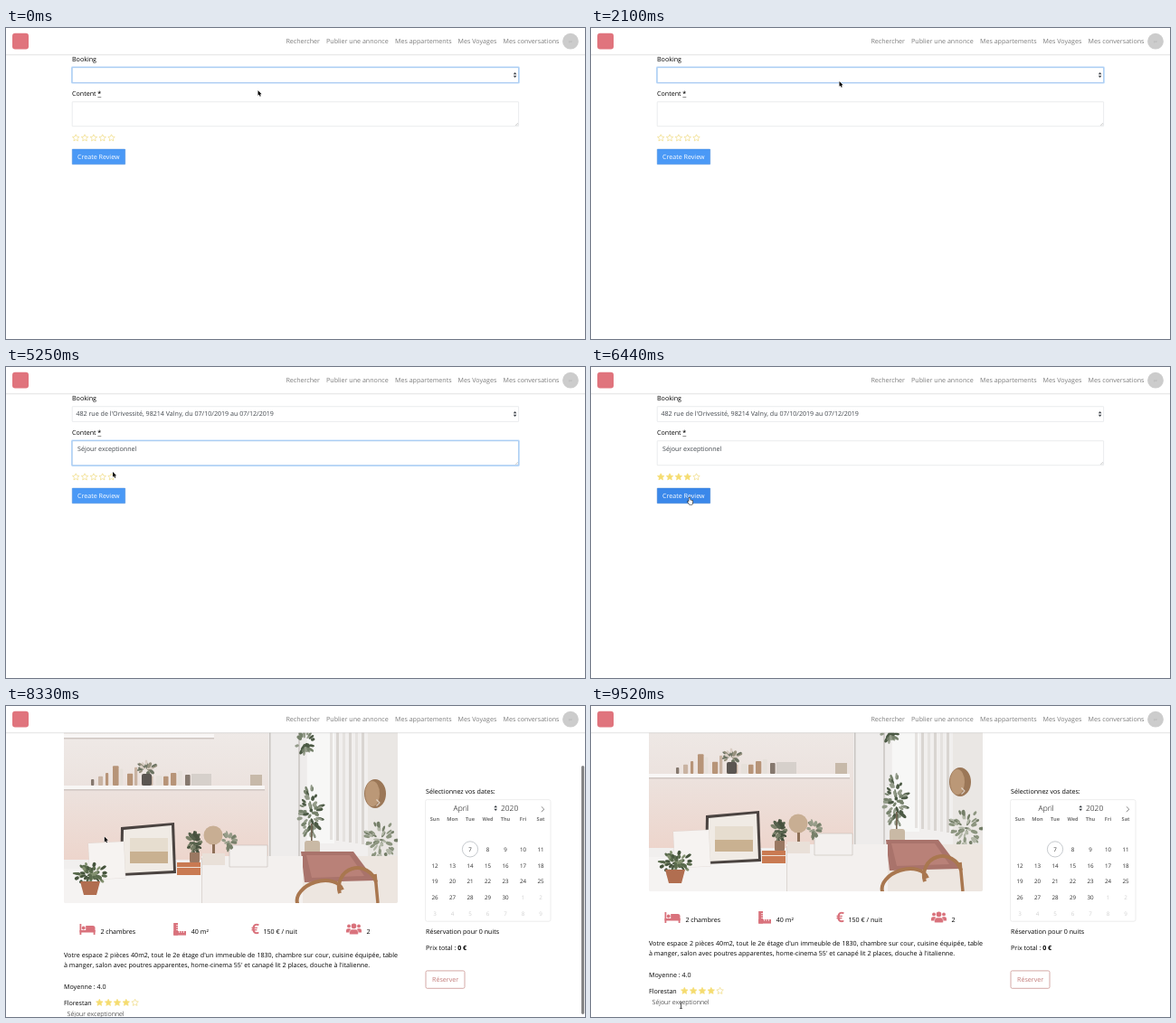
Recreate the animation shown at these times as an HTML page with a canvas. Size 640 by 344 pixels, loop 9.59 s.

```html
<!DOCTYPE html>
<html lang="fr">
<head>
<meta charset="utf-8">
<title>Review form</title>
<style>
  html, body { margin: 0; width: 100%; height: 100%; overflow: hidden; background: #fff; }
  canvas { display: block; width: 640px; height: 344px; }
</style>
</head>
<body>
<canvas id="stage"></canvas>
<script>
const W = 640, H = 344, LOOP = 9590, STEP = 70;
const ZOOM = 4 / 9; // page pixels to stage pixels
const PINK = '#d9727c', GOLD = '#f5dc70', INK = '#000';
const ADDRESS = "482 rue de l'Orivessité, 98214 Valny, du 07/10/2019 au 07/12/2019";
const REVIEW = 'Séjour exceptionnel';

const canvas = document.getElementById('stage');
const ctx = canvas.getContext('2d');
const dpr = window.devicePixelRatio || 1;
canvas.width = W * dpr;
canvas.height = H * dpr;

// ---------- helpers ----------
function rect(x, y, w, h, color) {
  ctx.fillStyle = color;
  ctx.fillRect(x, y, w, h);
}

function box(x, y, w, h, r, fill, stroke, line = 0.6) {
  ctx.beginPath();
  ctx.roundRect(x, y, w, h, r);
  if (fill) { ctx.fillStyle = fill; ctx.fill(); }
  if (stroke) { ctx.strokeStyle = stroke; ctx.lineWidth = line; ctx.stroke(); }
}

function ellipse(x, y, rx, ry, fill, turn = 0) {
  ctx.beginPath();
  ctx.ellipse(x, y, rx, ry, turn, 0, Math.PI * 2);
  ctx.fillStyle = fill;
  ctx.fill();
}

function shape(points, fill, stroke, line = 0.6, open = false) {
  ctx.beginPath();
  points.forEach(([x, y], i) => i ? ctx.lineTo(x, y) : ctx.moveTo(x, y));
  if (!open) ctx.closePath();
  ctx.lineJoin = 'round';
  if (stroke) { ctx.strokeStyle = stroke; ctx.lineWidth = line; ctx.stroke(); }
  if (fill) { ctx.fillStyle = fill; ctx.fill(); }
}

function randomFrom(seed) {
  return () => (seed = (seed * 16807) % 2147483647) / 2147483647;
}

// Scatters small leaves over an oval.
function foliage(x, y, rx, ry, count, colors) {
  const rnd = randomFrom(Math.round(x * 97 + y));
  for (let i = 0; i < count; i++) {
    const a = rnd() * Math.PI * 2, d = Math.sqrt(rnd());
    ellipse(x + rx * d * Math.cos(a), y + ry * d * Math.sin(a),
      2 + rnd() * 2, 1 + rnd(), colors[i % colors.length], a);
  }
}

function setFont(size, weight) {
  ctx.font = `${weight} ${size}px "Open Sans", sans-serif`;
  ctx.textRendering = 'geometricPrecision';
}

// Draws text at a stage position and returns its width in stage pixels.
function text(str, x, y, { size = 16, weight = 400, color = INK, align = 'left' } = {}) {
  ctx.save();
  ctx.translate(x, y);
  ctx.scale(ZOOM, ZOOM);
  setFont(size, weight);
  ctx.fillStyle = color;
  ctx.textAlign = align;
  ctx.fillText(str, 0, 0);
  const width = ctx.measureText(str).width * ZOOM;
  ctx.restore();
  return width;
}

function justified(str, x, y, width) {
  const words = str.split(' ');
  setFont(16, 400);
  const widths = words.map(w => ctx.measureText(w).width * ZOOM);
  const gap = (width - widths.reduce((a, b) => a + b)) / (words.length - 1);
  words.forEach((word, i) => {
    text(word, x, y);
    x += widths[i] + gap;
  });
}

function star(x, y, filled) {
  const points = Array.from({ length: 10 }, (_, i) => {
    const a = -Math.PI / 2 + i * Math.PI / 5, r = i % 2 ? 1.9 : 3.9;
    return [x + r * Math.cos(a), y + r * Math.sin(a)];
  });
  shape(points, filled ? GOLD : null, filled ? GOLD : '#f0da80', 0.7);
}

function stars(x, y, count) {
  for (let i = 0; i < 5; i++) star(x + i * 9.83, y, i < count);
}

function sortArrows(x, y) {
  shape([[x - 1.8, y - 0.7], [x + 1.8, y - 0.7], [x, y - 2.9]], '#343a40');
  shape([[x - 1.8, y + 0.7], [x + 1.8, y + 0.7], [x, y + 2.9]], '#343a40');
}

function field(x, y, w, h, focused) {
  if (focused) box(x - 1.2, y - 1.2, w + 2.4, h + 2.4, 1.4, '#bfdcfb');
  box(x, y, w, h, 0.4, '#fff', focused ? '#83b3e8' : '#dcdfe2');
}

const clamp = v => Math.max(0, Math.min(1, v));
const easeInOut = p => p < 0.5 ? 2 * p * p : 1 - 2 * (1 - p) * (1 - p);

// ---------- motion ----------
const PAGE_AT = 7350;

const path = [
  [140, 278.5, 69], [300, 150, 44], [420, 70, 95], [560, 220, 142], [700, 449, 139],
  [1050, 449, 139], [1400, 100, 139], [1540, 100, 139], [2100, 274.5, 59], [2170, 274, 55],
  [2450, 274, 55], [2870, 187, 87.5], [4690, 187, 87.5], [5460, 106, 121],
  [6020, 106, 121], [6440, 108.8, 144.6], [8890, 108.8, 144.6], [9520, 99.5, 331]
];

function cursorAt(t) {
  if (t <= path[0][0]) return path[0].slice(1);
  for (let i = 1; i < path.length; i++) {
    const [t0, x0, y0] = path[i - 1], [t1, x1, y1] = path[i];
    if (t <= t1) {
      const p = easeInOut((t - t0) / (t1 - t0));
      return [x0 + (x1 - x0) * p, y0 + (y1 - y0) * p];
    }
  }
  return path[path.length - 1].slice(1);
}

// Page scroll runs 3 px past its end, then springs back.
const SCROLL_MAX = 94;
function scrollAt(t) {
  const over = SCROLL_MAX + 3;
  if (t < 8610) return over * easeInOut(clamp((t - 7635) / 975));
  return over - 3 * easeInOut(clamp((t - 8610) / 490));
}

// ---------- header ----------
function header(dy) {
  rect(0, -4, W, 33.2 + dy, '#fff');
  rect(0, 29.2 + dy, W, 0.6, '#dedede');
  rect(0, 29.8 + dy, W, 0.8, 'rgba(0,0,0,.04)');
  box(7, 5.8 + dy, 18, 17.8, 3, '#e0747d');
  const links = [['Rechercher', 309.4], ['Publier une annonce', 354], ['Mes appartements', 430],
    ['Mes Voyages', 499.6], ['Mes conversations', 549.6]];
  for (const [label, x] of links) text(label, x, 17.3 + dy, { color: '#7c7c7c' });
  ellipse(624, 14.7 + dy, 8.9, 8.9, '#cccccc');
  text('pic', 624, 15.7 + dy, { size: 7, color: '#a9a9a9', align: 'center' });
}

// ---------- review form ----------
function form(t, mouse) {
  const focus = t < 2870 ? 'select' : t < 5670 ? 'content' : t >= 6720 ? 'button' : '';
  text('Booking', 73, 37.3);
  field(73.2, 43.7, 493.4, 16.7, focus === 'select');
  sortArrows(562.6, 52);
  if (t >= 2450) text(ADDRESS, 77.4, 54.4, { color: '#40464c' });

  const w = text('Content ', 73, 75.4);
  text('*', 73 + w, 75.4, { weight: 600 });
  rect(73 + w, 76, 3.9, 0.6, '#444');
  field(73.2, 81.7, 493.4, 27, focus === 'content');
  for (const d of [1.5, 3]) {
    shape([[566 - d, 108], [566, 108 - d]], null, '#999', 0.4, true);
  }
  let caretX = 79.4;
  if (t >= 4130) caretX = 79 + text(REVIEW, 79, 92.6, { color: '#40464c' }) + 0.3;
  const caretOn = focus === 'content' && !(t >= 3290 && t < 3850) && t < 4620;
  if (caretOn) rect(caretX, 85.4, 0.6, 9.3, '#444');

  stars(77.2, 121.7, t >= 5670 ? 4 : 0);

  const hover = overButton(mouse);
  if (focus === 'button') box(71.8, 132.7, 61.3, 19.5, 1.4, '#b9d8fb');
  box(73.2, 134.1, 58.5, 16.7, 0.4, hover ? '#3a88ea' : '#4a99f6', hover ? '#3679cd' : '#4788d8', 0.5);
  text('Create Review', 79, 145, { color: '#fff' });
}

// ---------- flat page ----------
function wallAndShelves() {
  const wall = ctx.createLinearGradient(0, 0, 0, 170);
  wall.addColorStop(0, '#f0edeb');
  wall.addColorStop(0.5, '#ece3df');
  wall.addColorStop(1, '#edd5cc');
  rect(64, -4, 369, 222, '#f1efee');
  rect(64, -4, 226, 174, wall);

  for (const [y, w] of [[31, 166], [88, 222]]) {
    rect(64, y, w, 4, '#f8f6f5');
    rect(64, y + 4, w, 1.5, '#cfc6c2');
  }
  const rnd = randomFrom(31);
  for (let x = 94; x < 200; x += 8) {
    const h = 7 + rnd() * 15;
    box(x, 88 - h, 3 + rnd() * 4, h, 1, ['#b79478', '#85786e', '#e6e0da', '#c9b3a2'][Math.floor(rnd() * 4)]);
  }
  foliage(156, 69, 9, 7, 22, ['#6c7362', '#98927f', '#d9cdc4']);
  box(150, 75, 11, 13, 2, '#5b5652');
  rect(205, 75, 22, 13, '#d6d0cb');
  rect(270, 76, 13, 12, '#c7b9a9');
}

function windowSide() {
  rect(290, -4, 42, 170, '#eeeceb');
  rect(291, -4, 1.5, 170, '#c9c5c2');
  rect(323, -4, 2, 170, '#d2cecb');
  rect(333, -4, 30, 156, '#f7f7f6');
  for (let i = 0; i < 6; i++) rect(358 + i * 7, -4, 3, 152 + i, i % 2 ? '#d9d5d1' : '#e5e2df');
  rect(400, -4, 33, 170, '#eae7e4');
  ellipse(408, 97, 12, 16, '#9b7757');
  ellipse(405, 97, 8, 14, '#bb9877');
  const green = ['#4c5a45', '#76826c', '#939b89'];
  foliage(330, 42, 10, 14, 26, green);
  foliage(337, 118, 13, 28, 60, green);
  rect(337, 130, 1.6, 24, '#756553');
  box(330, 149, 17, 19, 3, '#c9b9a5');
  foliage(414, 148, 18, 20, 50, ['#8c957f', '#b1b6a6', '#747e68']);
}

function furniture() {
  rect(326, 166, 107, 52, '#ede6e0');
  shape([[326, 161], [384, 161], [408, 193], [330, 195]], '#a9736b');
  shape([[332, 165], [380, 165], [396, 188], [338, 190]], '#b98178');
  rect(64, 180, 264, 38, '#f5f3f2');
  rect(216, 166, 112, 52, '#f3f0ee');
  rect(216, 168, 1, 50, '#dcd6d2');

  shape([[127, 134], [186, 129], [188, 185], [126, 188]], '#4a4340');
  shape([[130, 137], [183, 132], [185, 182], [129, 185]], '#f0ebe5');
  rect(137, 146, 42, 15, '#e6ddcf');
  rect(137, 161, 42, 13, '#c9b191');
  shape([[91, 152], [130, 150], [132, 190], [93, 192]], '#f6f3f1', '#d8d0cb');
  box(247, 154, 42, 24, 0, '#f3f0ee', '#c4bdb8');
  rect(189, 173, 26, 14, '#c97a52');
  rect(189, 178, 26, 1, '#eee2d8');

  foliage(208, 152, 7, 12, 34, ['#55604b', '#7a8069', '#48513f']);
  box(203, 162, 11, 11, 1, '#9a7862');
  ellipse(229, 143, 10.5, 10.5, '#c8ae93');
  rect(228, 153, 3, 11, '#8e7058');
  foliage(246, 150, 7, 9, 20, ['#77806a', '#969c88']);
  rect(217, 163, 25, 13, '#e9e0d8');
  foliage(93, 186, 18, 13, 55, ['#5a6b4d', '#82906f', '#45543c']);
  shape([[82, 194], [104, 194], [100, 209], [86, 209]], '#b16e50');

  ctx.strokeStyle = '#a9774f';
  ctx.lineWidth = 4;
  for (const [x, y, rx, ry] of [[389, 201, 21, 22], [347, 211, 26, 17]]) {
    ctx.beginPath();
    ctx.ellipse(x, y, rx, ry, -0.3, Math.PI, Math.PI * 2);
    ctx.stroke();
  }
  shape([[408, 186], [411, 218]], null, '#a9774f', 3.5, true);
}

function photo(bottom) {
  ctx.save();
  ctx.beginPath();
  ctx.roundRect(64, bottom - 222, 369, 222, 2);
  ctx.clip();
  ctx.translate(0, bottom - 218);
  wallAndShelves();
  windowSide();
  furniture();
  shape([[409.5, 103.5], [413, 107], [409.5, 110.5]], null, 'rgba(255,255,255,.6)', 1.2, true);
  ctx.restore();
}

function icons(y) {
  // bed
  rect(81.5, y - 6, 1.8, 12, PINK);
  rect(81.5, y + 1, 17, 2.5, PINK);
  rect(96.7, y + 1, 1.8, 5, PINK);
  box(88.2, y - 4, 10.3, 6, [0, 2.5, 0, 0], PINK);
  ellipse(85.7, y - 1.5, 1.9, 1.9, PINK);
  // ruler
  rect(185.2, y - 7, 4.8, 13.6, PINK);
  rect(185.2, y + 2, 13.8, 4.6, PINK);
  for (let i = 0; i < 3; i++) {
    rect(188, y - 5 + i * 2.6, 2, 0.7, '#fff');
    rect(191 + i * 2.6, y + 2, 0.7, 2, '#fff');
  }
  text('€', 271, y + 4.8, { size: 35, weight: 700, color: PINK });
  // group
  for (const [x, r] of [[379, 1.9], [390, 1.9], [384.5, 2.8]]) ellipse(x, y - 3.6, r, r, PINK);
  box(376, y - 0.7, 5, 4.2, [2, 1, 0, 0], PINK);
  box(388, y - 0.7, 5, 4.2, [1, 2, 0, 0], PINK);
  box(379.6, y + 0.1, 9.8, 5.6, [3, 3, 1, 1], PINK, '#fff', 0.5);
}

function calendar(dy) {
  ctx.save();
  ctx.translate(0, dy);
  text('Sélectionnez vos dates:', 464, 96.6);
  box(463.6, 103.6, 138.4, 134.6, 2, '#fff', '#ebebeb', 0.9);
  text('April', 494.6, 115.9, { size: 18.9, weight: 300 });
  sortArrows(541.2, 113);
  text('2020', 547, 115.9, { size: 18.9, weight: 300 });
  shape([[591.8, 111.3], [594.8, 114.2], [591.8, 117.1]], null, '#555', 0.7, true);

  const colX = i => 474 + i * 19.5;
  ['Sun', 'Mon', 'Tue', 'Wed', 'Thu', 'Fri', 'Sat'].forEach((day, i) =>
    text(day, colX(i), 127, { size: 12.6, weight: 700, color: '#757575', align: 'center' }));
  ctx.beginPath();
  ctx.arc(513, 158.4, 8.6, 0, Math.PI * 2);
  ctx.strokeStyle = '#a0a6ad';
  ctx.lineWidth = 0.6;
  ctx.stroke();
  for (let day = 7; day <= 39; day++) {
    const cell = day - 5, next = day > 30;
    text(next ? day - 30 : day, colX(cell % 7), 160.8 + Math.floor(cell / 7) * 17.75,
      { size: 14, color: next ? '#d0d0d0' : '#2c2c2c', align: 'center' });
  }

  text('Réservation pour 0 nuits', 464, 251.7);
  const w = text('Prix total : ', 464, 269.6);
  text('0 €', 464 + w, 269.6, { weight: 700 });
  box(464, 292.9, 43, 19.4, 1.6, '#fff', '#c99490', 0.8);
  text('Réserver', 485.6, 305.4, { color: '#c27a78', align: 'center' });
  ctx.restore();
}

function flat(t) {
  const scroll = scrollAt(t);
  const y = 299 - scroll;
  photo(y);
  icons(y + 29);
  const facts = [['2 chambres', 104.4], ['40 m²', 204.8], ['150 € / nuit', 284.4], ['2', 398.4]];
  for (const [label, x] of facts) text(label, x, y + 33.7);
  justified("Votre espace 2 pièces 40m2, tout le 2e étage d'un immeuble de 1830, chambre sur cour, cuisine équipée, table",
    64, y + 60.2, 369);
  text("à manger, salon avec poutres apparentes, home-cinema 55' et canapé lit 2 places, douche à l'italienne.",
    64, y + 70.7);
  text('Moyenne : 4.0', 64, y + 94.9);
  text('Florestan', 64, y + 112.6);
  stars(103.3, y + 110.2, 4);
  text(REVIEW, 67.5, y + 125, { weight: 300 });

  const bounce = Math.min(0, SCROLL_MAX - scroll);
  calendar(bounce);
  header(bounce);

  const shown = clamp((9310 - t) / 140);
  if (t >= 7560 && shown) {
    const top = 10 + scroll * 0.69;
    ctx.globalAlpha = shown;
    box(636, top, 3.2, Math.min(H, top + 275) - top, 1.6, '#858585');
    ctx.globalAlpha = 1;
  }
}

// ---------- mouse pointer ----------
const inside = ([x, y], l, t, r, b) => x >= l && x <= r && y >= t && y <= b;
const overButton = m => inside(m, 73, 134, 132, 151);

function pointerKind(t, m) {
  if (t >= PAGE_AT) return inside(m, 64, 322, 132, 336) ? 'beam' : 'arrow';
  if (overButton(m) || inside(m, 73, 117, 121, 126)) return 'hand';
  return inside(m, 73, 82, 567, 109) ? 'beam' : 'arrow';
}

function pointer(kind, [x, y]) {
  ctx.save();
  ctx.translate(x, y);
  if (kind === 'arrow') {
    shape([[0, 0], [0, 5.8], [1.3, 4.6], [2.2, 6.7], [3.2, 6.3], [2.3, 4.2], [4.1, 4.2]], '#000', '#fff', 0.9);
  } else if (kind === 'beam') {
    rect(-0.35, -3, 0.8, 6.4, '#222');
    rect(-1.5, -3.5, 3, 0.7, '#333');
    rect(-1.5, 3.2, 3, 0.7, '#333');
  } else {
    shape([[-0.5, 0], [0.6, 0], [0.8, 2.6], [3.4, 3.2], [3.7, 5], [2.9, 7.4], [0, 7.4], [-2, 4.4], [-1.2, 3.8], [-0.5, 4.5]],
      '#fff', '#111', 1.1);
  }
  ctx.restore();
}

function draw(t) {
  ctx.setTransform(dpr, 0, 0, dpr, 0, 0);
  rect(0, 0, W, H, '#fff');
  const mouse = cursorAt(t);
  if (t < PAGE_AT) {
    header(0);
    form(t, mouse);
  } else {
    flat(t);
  }
  pointer(pointerKind(t, mouse), mouse);
}

const start = performance.now();
function tick() {
  const t = (performance.now() - start) % LOOP;
  draw(Math.floor(t / STEP) * STEP);
  requestAnimationFrame(tick);
}
tick();
</script>
</body>
</html>
```
